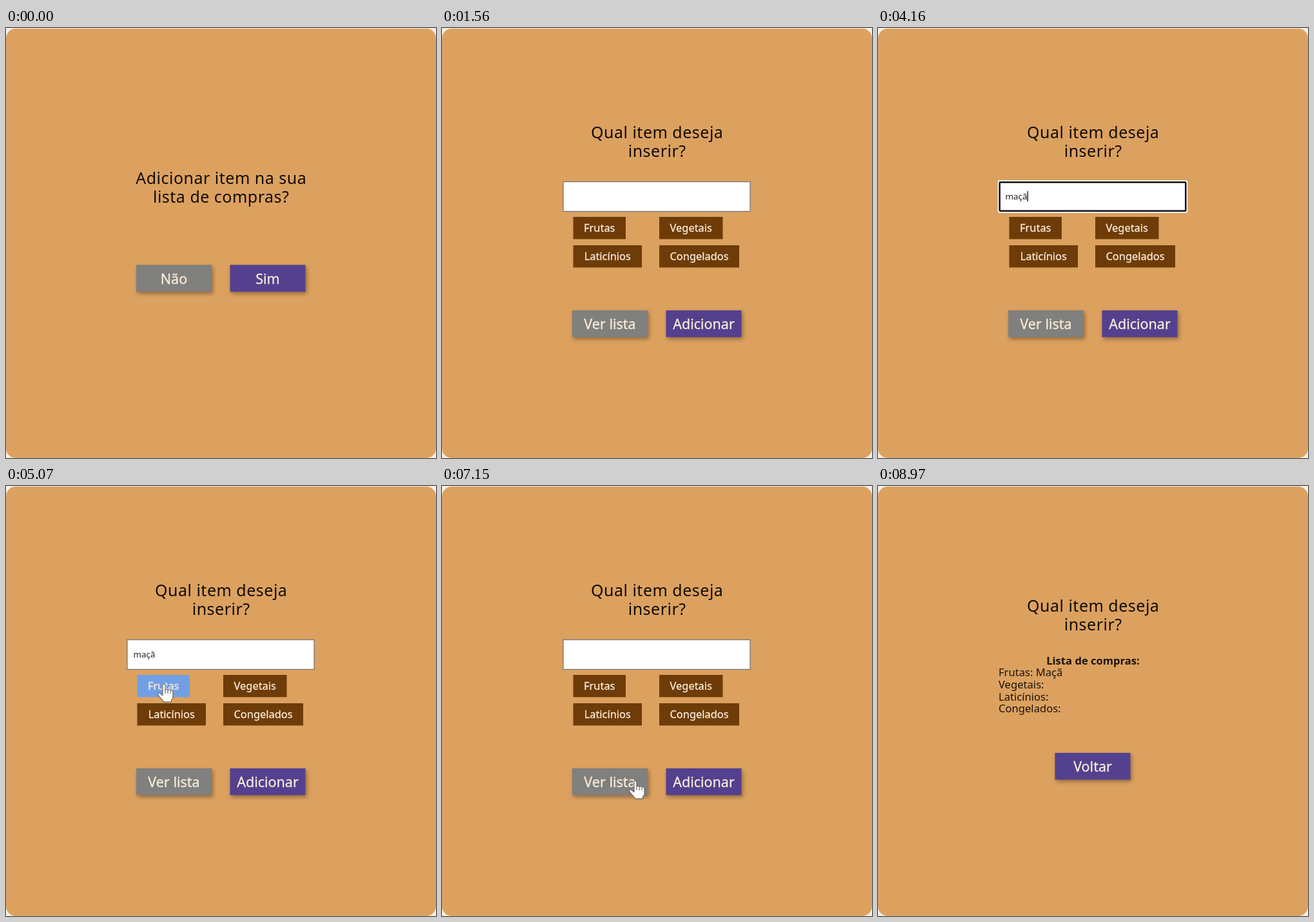
Write an HTML page that moves like this. It is 667 px wide and 667 px high and loops after 9360 ms.

```html
<!DOCTYPE html>
<html lang="pt">
<head>
<meta charset="utf-8">
<style>
  html, body { margin: 0; width: 100%; height: 100%; overflow: hidden; background: #f7eee2; }
  svg { display: block; width: 100%; height: 100%; font-family: "Noto Sans", "Open Sans", sans-serif; }
  .title { font-size: 25px; letter-spacing: .5px; text-anchor: middle; fill: #120d08; }
  .label { text-anchor: middle; fill: #faebd7; stroke: #faebd7; stroke-width: .3px; }
  .button { font-size: 21.5px; }
  .tag { font-size: 16.4px; }
  .list { font-size: 16.6px; fill: #1c140b; }
  .head { font-weight: bold; text-anchor: middle; }
  .typed { font-size: 13.4px; fill: #222; }
  .shadow { filter: drop-shadow(2px 3px 3px rgba(0, 0, 0, .35)); }
</style>
</head>
<body>
<svg id="stage" viewBox="0 0 667 667">
  <rect y="1" width="667" height="666" rx="15" fill="#dca15f"/>
  <g id="ask"></g>
  <g id="form"></g>
  <g id="list"></g>
  <g id="hand" fill="#fff" stroke="#4d4d4d" stroke-linejoin="round">
    <path d="M-2 1Q0-1 2 1V9Q4 7.500 6 9.500Q8 8 10 10Q13 9 14 12V20Q14 23 11.500 25V28H-1.500V26L-9 17Q-10 13-7 14L-2 18Z"/>
    <path d="M2 9V15M6 10V15M10 11V15" fill="none"/>
  </g>
</svg>
<script>
const LOOP = 9360;
const BLUE = '#53418f', GRAY = '#80807e', BROWN = '#6e3c08', PICKED = '#729fe4';
const $ = id => document.getElementById(id);

const text = (x, y, cls, str) => `<text x="${x}" y="${y}" class="${cls}">${str}</text>`;
const title = (y, a, b) => text(333.7, y, 'title', a) + text(333.7, y + 29.3, 'title', b);
const button = (x, y, color, str) =>
  `<rect class="shadow" x="${x}" y="${y}" width="117" height="41.500" fill="${color}"/>` +
  text(x + 58.5, y + 29, 'label button', str);
const tag = (x, y, w, str, id = '') =>
  `<rect id="${id}" x="${x}" y="${y}" width="${w}" height="34.500" fill="${BROWN}"/>` +
  text(x + w / 2, y + 23, 'label tag', str);

$('ask').innerHTML = title(241.5, 'Adicionar item na sua', 'lista de compras?') +
  button(202, 367.5, GRAY, 'Não') + button(347.5, 367.5, BLUE, 'Sim');

$('form').innerHTML = title(170.5, 'Qual item deseja', 'inserir?') +
  '<rect x="188" y="238.500" width="290" height="46" fill="#fff" stroke="#767676" stroke-width="1.300"/>' +
  `<g id="focus" fill="none">
    <rect x="187" y="237.500" width="292" height="48" rx="2" stroke="#fff" stroke-width="2.500"/>
    <rect x="188.700" y="239.200" width="288.600" height="44.600" rx="1" stroke="#101010" stroke-width="2.500"/>
  </g>` +
  text(197.5, 266, 'typed', '') +
  '<rect id="caret" y="253" width="1.300" height="16"/>' +
  tag(203.5, 293, 81.5, 'Frutas', 'fruit') + tag(337, 293, 98.5, 'Vegetais') +
  tag(203.5, 337, 106.5, 'Laticínios') + tag(337, 337, 124, 'Congelados') +
  button(202, 438, GRAY, 'Ver lista') + button(347.5, 438, BLUE, 'Adicionar');

$('list').innerHTML = title(194.5, 'Qual item deseja', 'inserir?') +
  text(333.5, 276.5, 'list head', 'Lista de compras:') +
  ['Frutas: Maçã', 'Vegetais:', 'Laticínios:', 'Congelados:']
    .map((s, i) => text(187, 295.3 + i * 18.7, 'list', s)).join('') +
  button(274.5, 414, BLUE, 'Voltar');

const typed = document.querySelector('.typed');

// Each track holds [start, ...value] steps.
const screens = [[0, 'ask'], [910, 'form'], [7800, 'list']];
const typing = [[0, ''], [2990, 'm'], [3120, 'ma'], [3250, 'maç'], [4160, 'maçã'], [6110, '']];
const blink = [[0, false], [2080, true], [2600, false], [2990, true], [3770, false],
  [4030, true], [4680, false]];
const pointer = [[0], [390, 406, 386], [910], [4940, 245, 307], [5330], [5460, 382, 456],
  [5720, 400, 475], [6760, 372, 465], [7150, 300, 457], [7800]];

const at = (track, t) => track.findLast(step => step[0] <= t).slice(1);
const show = (id, on) => $(id).style.display = on ? '' : 'none';

function draw(now) {
  const t = now % LOOP;
  const [screen] = at(screens, t);
  for (const id of ['ask', 'form', 'list']) show(id, id === screen);

  const [word] = at(typing, t);
  if (typed.textContent !== word) typed.textContent = word;
  show('focus', t >= 2080 && t < 5070);
  show('caret', at(blink, t)[0]);
  $('caret').setAttribute('x', 197.5 + (word && screen === 'form' ? typed.getComputedTextLength() : 0));
  $('fruit').setAttribute('fill', t >= 5070 && t < 6110 ? PICKED : BROWN);

  const [x, y] = at(pointer, t);
  show('hand', x !== undefined);
  if (x !== undefined) $('hand').setAttribute('transform', `translate(${x} ${y})`);
}

const start = performance.now();
(function tick() {
  draw(performance.now() - start);
  requestAnimationFrame(tick);
})();
</script>
</body>
</html>
```
